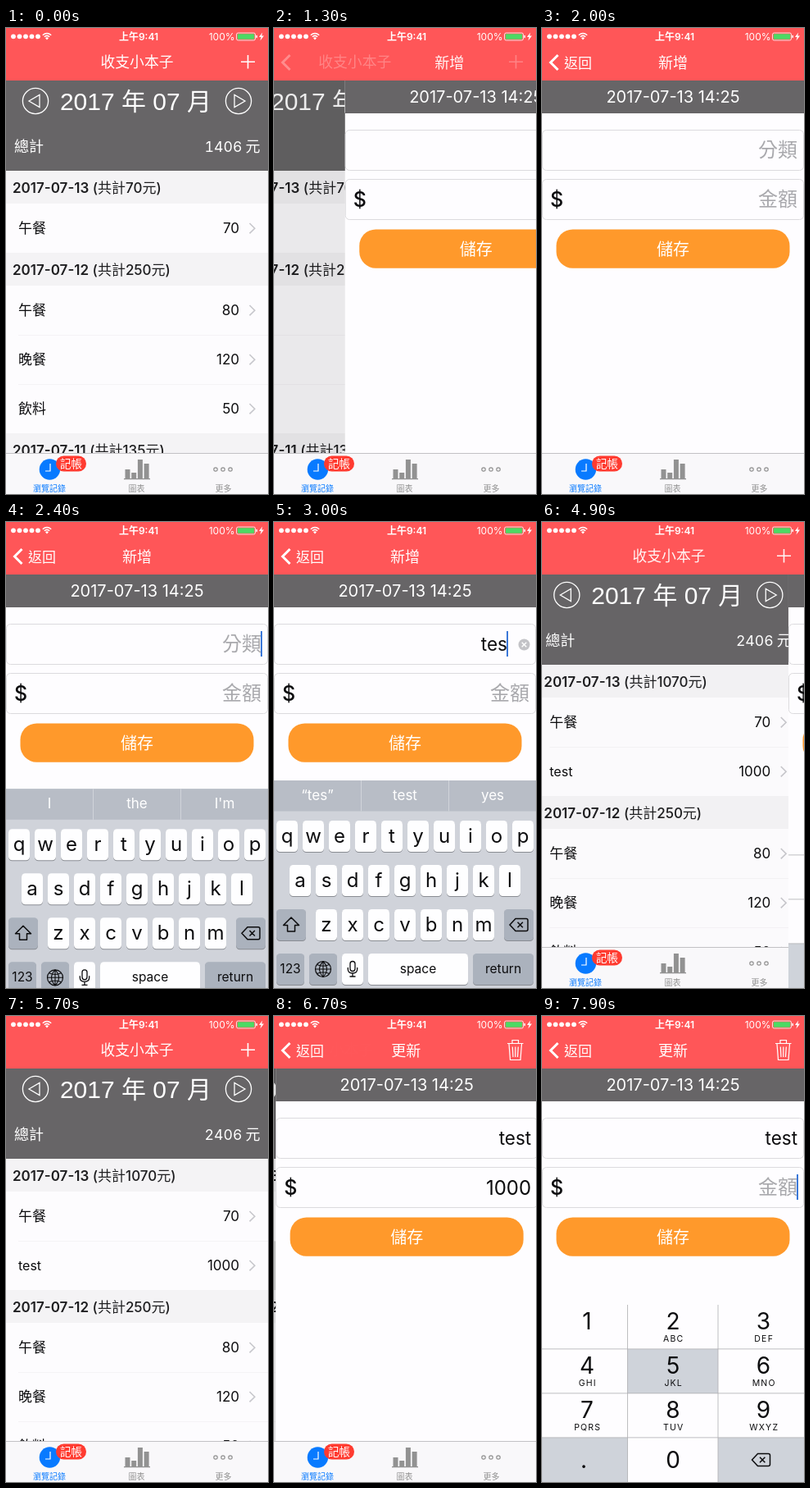
An HTML page that plays this animation: 320x568 px, repeating every 8000 ms.

```html
<!DOCTYPE html>
<html lang="zh-Hant">
<head>
<meta charset="utf-8">
<title>收支小本子</title>
<style>
html, body { margin: 0; width: 100%; height: 100%; overflow: hidden; background: #fff; }
svg { display: block; width: 320px; height: 568px; }
text { font-family: Inter, 'Noto Sans CJK TC', 'Noto Sans CJK', 'Noto Sans CJK JP', sans-serif; white-space: pre; }
.wide { font-family: 'Liberation Sans', 'Noto Sans CJK TC', 'Noto Sans CJK JP', sans-serif; font-weight: 300; }
.total { font-variant-numeric: tabular-nums; }
</style>
</head>
<body>
<svg id="stage" viewBox="0 0 320 568"></svg>
<script>
const stage = document.getElementById('stage');
const RED = '#ff5658', GREY = '#676567', BLUE = '#087aff', INK = '#0c0c0e';
const KEY_DARK = '#abb2bd', KEY_BG = '#d0d3da';

function el(parent, tag, attrs = {}, content) {
  const node = document.createElementNS('http://www.w3.org/2000/svg', tag);
  for (const k in attrs) node.setAttribute(k, attrs[k]);
  if (content !== undefined) node.textContent = content;
  parent.appendChild(node);
  return node;
}
const group = (parent) => el(parent, 'g');
const rect = (p, x, y, width, height, fill, more) => el(p, 'rect', { x, y, width, height, fill, ...more });
const circle = (p, cx, cy, r, more) => el(p, 'circle', { cx, cy, r, ...more });
const line = (p, d, stroke, width = 1, more) =>
  el(p, 'path', { d, stroke, 'stroke-width': width, fill: 'none', ...more });
// cy is the optical centre of the line of text
const text = (p, x, cy, str, size, fill = INK, anchor = 'start', more) =>
  el(p, 'text', { x, y: cy + size * 0.363, 'font-size': size, fill, 'text-anchor': anchor, ...more }, str);
const move = (node, x, y = 0) => node.setAttribute('transform', `translate(${x.toFixed(2)} ${y.toFixed(2)})`);
const show = (node, on) => node.setAttribute('opacity', Math.max(0, Math.min(1, +on)));
const setText = (node, s) => { if (node.textContent !== s) node.textContent = s; };

// ---- list screen
const day12 = ['2017-07-12', 250, [['午餐', 80], ['晚餐', 120], ['飲料', 50]]];
const day11 = ['2017-07-11', 135, []];
const before = [['2017-07-13', 70, [['午餐', 70]]], day12, day11];
const after = [['2017-07-13', 1070, [['午餐', 70], ['test', 1000]]], day12, day11];

function buildList(total, days) {
  const g = group(stage);
  rect(g, 0, 64, 320, 504, '#fdfcfe');
  rect(g, 0, 64, 320, 110, GREY);
  for (const [cx, s] of [[36, -1], [284, 1]]) {
    circle(g, cx, 89, 15.6, { fill: 'none', stroke: '#fff', 'stroke-width': 1.3 });
    line(g, `M${cx + 8 * s} 89L${cx - 5 * s} 81.5V96.5Z`, '#fff', 1.3);
  }
  text(g, 158.5, 89.2, '2017 年 07 月', 30, '#fff', 'middle', { class: 'wide' });
  text(g, 10, 144, '總計', 18, '#fff', 'start', { class: 'wide' });
  text(g, 288.5, 144.5, total, 17.7, '#fff', 'end', { class: 'total' });
  text(g, 310.5, 144, '元', 18, '#fff', 'end', { class: 'wide' });
  let y = 174, picked;
  for (const [date, sum, rows] of days) {
    rect(g, 0, y, 320, 40, '#f4f3f5');
    const head = text(g, 8, y + 21, '', 17, '#1e1e20');
    el(head, 'tspan', { 'font-weight': 600 }, date);
    el(head, 'tspan', { 'font-weight': 500 }, ` (共計${sum}元)`);
    y += 40;
    rows.forEach(([name, cost], i) => {
      const bg = rect(g, 0, y, 320, 60, '#d9d9d9', { opacity: 0 });
      if (name === 'test') picked = bg;
      if (i) rect(g, 15, y, 305, 0.6, '#f0eff2');
      text(g, 15, y + 30, name, name === 'test' ? 16 : 17);
      text(g, 285, y + 30, cost, 17, INK, 'end');
      line(g, `M297.5 ${y + 24}l6.3 6.2l-6.3 6.2`, '#c7c7cc', 1.6);
      y += 60;
    });
  }
  return { g, picked };
}
const lists = [buildList(1406, before), buildList(2406, after)];
const shade = rect(stage, 0, 64, 320, 504, '#000');

// ---- entry form
const page = group(stage);
rect(page, 0, 64, 320, 504, '#fefdff');
rect(page, 0, 64, 320, 40, GREY);
text(page, 160, 84, '2017-07-13 14:25', 20, '#fff', 'middle');
function buildField(y, hint, size) {
  rect(page, 0.5, y + 0.5, 319, 49, '#fefdff', { rx: 5, stroke: '#dcdbde' });
  const clear = group(page);
  circle(clear, 305.5, y + 25.5, 7, { fill: '#c3c3c7' });
  line(clear, `M302.7 ${y + 22.7}l5.6 5.6m0 -5.6l-5.6 5.6`, '#fff', 1.4);
  return {
    clear,
    hint: text(page, 312, y + 24.4, hint, 24, '#a9a9ad', 'end', { 'font-weight': 300 }),
    value: text(page, 312, y + 25, '', size, INK, 'end'),
    caret: rect(page, 0, y + 9, 2, 31, '#3b78d8')
  };
}
const kind = buildField(124, '分類', 22.5), sum = buildField(184, '金額', 24);
text(page, 10, 209, '$', 25, INK, 'start', { 'font-weight': 500 });
rect(page, 17.5, 245.5, 285, 47.2, '#ff992b', { rx: 20 });
const save = text(page, 160, 270, '儲存', 20, '#fff', 'middle');

// ---- tab bar
const tabs = group(stage);
rect(tabs, 0, 518, 320, 50, '#f9f8fa');
rect(tabs, 0, 518, 320, 0.8, '#b4b4b7');
circle(tabs, 53.4, 538, 12.7, { fill: BLUE });
line(tabs, 'M54 531V540H48', '#fff', 1.2);
rect(tabs, 61, 521.5, 37, 19, '#ff3b30', { rx: 9.5 });
text(tabs, 79.5, 531, '記帳', 13.5, '#fff', 'middle');
[12, 8, 24, 19].forEach((h, i) => rect(tabs, 145.5 + i * 7.7, 550 - h, 6, h, '#929292'));
rect(tabs, 144, 549, 32, 1.3, '#929292');
for (const x of [256, 265, 274])
  circle(tabs, x, 538, 2.2, { fill: 'none', stroke: '#929292', 'stroke-width': 1.2 });
[['瀏覽記錄', 53, BLUE], ['圖表', 159.5, '#929292'], ['更多', 265.5, '#929292']]
  .forEach(([s, x, c]) => text(tabs, x, 561, s, 10, c, 'middle'));

// ---- navigation and status bar
rect(stage, 0, 0, 320, 64, RED);
const nav = group(stage);
const home = text(nav, 160, 42, '收支小本子', 17.8, '#fff', 'middle');
const title = text(nav, 160, 42, '', 18, '#fff', 'middle');
const chevron = line(nav, 'M19.5 33L10.5 42L19.5 51', '#fff', 3);
const back = text(nav, 27, 42.4, '返回', 17, '#fff');
const plus = line(nav, 'M287 41.2H304M295.5 33V49.5', '#fff', 1.6);
const trash = line(nav, 'M285 33.5H304.5M291 33V29.5H298.5V33M287 34L288.5 53.5H301L302.5 34M291.3 37.5L292 50M294.8 37.5V50M298.3 37.5L297.5 50', '#fff', 1.2);

for (let i = 0; i < 5; i++) circle(stage, 9 + i * 7.5, 10.3, 2.9, { fill: '#fff' });
line(stage, 'M44.8 8.7Q50 4.3 55.2 8.7M46.8 10.8Q50 8 53.2 10.8', '#fff', 1.5);
el(stage, 'path', { d: 'M48 12.2Q50 10.5 52 12.2L50 14.4Z', fill: '#fff' });
text(stage, 162, 10.5, '上午9:41', 12, '#fff', 'middle', { 'font-weight': 600 });
text(stage, 279.5, 10.5, '100%', 12, '#fff', 'end');
rect(stage, 281.5, 6, 23, 9, 'none', { rx: 2, stroke: '#fff', 'stroke-width': 0.8 });
rect(stage, 282.8, 7.2, 20.4, 6.6, '#4cd964', { rx: 1 });
rect(stage, 305.4, 8.8, 1.5, 3.4, '#fff', { rx: 0.7 });
el(stage, 'path', { d: 'M313.2 5.5L309 11H311.6L310.4 15.5L315 9.6H312.2Z', fill: '#fff' });

// ---- letter keyboard
const letters = group(stage);
rect(letters, 0, 315, 320, 253, KEY_BG);
rect(letters, 0, 315, 320, 37.5, '#b8bdc6');
for (const x of [106, 213]) rect(letters, x, 315, 1, 37.5, '#d0d4da');
const guesses = [53, 160, 267].map(x => text(letters, x, 332.5, '', 17, '#fff', 'middle'));
const keyPos = {};
function key(x, y, w, label = '', size = 24, fill = '#fefeff') {
  rect(letters, x, y + 1, w, 38, '#898c92', { rx: 4.5 });
  rect(letters, x, y, w, 38, fill, { rx: 4.5 });
  text(letters, x + w / 2, y + 18.5, label, size, INK, 'middle');
}
[['qwertyuiop', 3, 364], ['asdfghjkl', 19, 418], ['zxcvbnm', 51, 472]].forEach(([row, x0, y]) =>
  [...row].forEach((c, i) => {
    keyPos[c] = [x0 + i * 32, y];
    key(x0 + i * 32, y, 26, c);
  }));
key(3, 472, 36, '', 16, KEY_DARK);
key(281, 472, 36, '', 16, KEY_DARK);
key(3, 526, 34, '123', 15.5, KEY_DARK);
key(43, 526, 34, '', 16, KEY_DARK);
key(83, 526, 26);
key(115, 526, 122, 'space', 15.5);
key(243, 526, 74, 'return', 15.5, KEY_DARK);
line(letters, 'M21 482L30.5 491.5H25.5V499H16.5V491.5H11.5Z', INK, 1.5, { 'stroke-linejoin': 'round' });
const erase = (p, x, y) => line(p,
  `M${x - 11} ${y}l7 -7.5h13q2 0 2 2v11q0 2 -2 2h-13zM${x - 1.5} ${y - 3.2}l6.4 6.4m0 -6.4l-6.4 6.4`, INK, 1.5);
erase(letters, 299, 491);
circle(letters, 60, 545, 9.5, { fill: 'none', stroke: INK, 'stroke-width': 1.2 });
line(letters, 'M50.5 545H69.5M60 535.5V554.5M52.5 539.5Q60 543 67.5 539.5M52.5 550.5Q60 547 67.5 550.5M60 535.5Q51 545 60 554.5Q69 545 60 535.5', INK, 1.1);
rect(letters, 93, 535.5, 6, 12, 'none', { rx: 3, stroke: INK, 'stroke-width': 1.3 });
line(letters, 'M90.3 543V545Q90.3 550 96 550Q101.7 550 101.7 545V543M96 550V554M92.5 554H99.5', INK, 1.3);
const bubble = group(letters);
el(bubble, 'path', {
  d: 'M-3 -52H29Q36 -52 36 -45V-18Q36 -12 31 -8Q26 -4 26 2V34Q26 38 22 38H4Q0 38 0 34V2Q0 -4 -5 -8Q-10 -12 -10 -18V-45Q-10 -52 -3 -52Z',
  fill: '#fefeff', stroke: '#b6b9bf', 'stroke-width': 0.6
});
const bubbleText = text(bubble, 13, -29, '', 35, INK, 'middle');

// ---- number keyboard
const pad = group(stage);
rect(pad, 0, 352, 320, 216, '#fefdff');
const padKeys = {};
const cols = [[0, 104.5, 55], [104.5, 110.5, 160], [215, 105, 270.5]];
['1', '2ABC', '3DEF', '4GHI', '5JKL', '6MNO', '7PQRS', '8TUV', '9WXYZ', '.', '0', '<'].forEach((s, i) => {
  const [x, w, cx] = cols[i % 3], y = 352 + 54 * Math.floor(i / 3), c = s[0];
  padKeys[c] = rect(pad, x, y, w, 54, '#cfd3da');
  if (c === '<') erase(pad, 267.5, y + 27);
  else text(pad, c === '.' ? 51 : cx, y + (i < 9 ? 20 : 27), c, 28, INK, 'middle');
  if (s.length > 1)
    text(pad, cx + 0.7, y + 41, s.slice(1), 10.5, INK, 'middle', { 'letter-spacing': 1.2 });
});
for (const y of [406, 460, 514]) rect(pad, 0, y - 0.5, 320, 0.8, '#aeaeb2');
for (const x of [104.5, 215]) rect(pad, x - 0.4, 352, 0.8, 216, '#aeaeb2');

// ---- timeline: [start in ms, value]
const LOOP = 8000;
const POP = 4650, REOPEN = 6305;
const steps = {
  plus: [[0, 1], [200, 0.3], [700, 0.65], [800, 1]],
  focus: [[0, ''], [2100, 'kind'], [3500, 'sum'], [5200, ''], [7400, 'sum']],
  kind: [[0, ''], [2700, 't'], [2900, 'te'], [3000, 'tes'], [3200, 'test']],
  sum: [[0, ''], [3700, '1'], [3900, '10'], [4000, '100'], [4200, '1000'], [7400, '']],
  letter: [[0, ''], [2600, 't'], [2700, ''], [2800, 'e'], [2900, 's'], [3000, ''], [3100, 't'], [3200, '']],
  digit: [[0, ''], [3600, '1'], [3700, ''], [3800, '0'], [3900, ''], [4000, '0'], [4200, ''], [7900, '5']],
  save: [[0, 1], [4500, 0.3], [4700, 1]],
  row: [[0, 0], [6000, 1]]
};
const hints = {
  '': ['I', 'the', "I'm"], t: ['“t”', 'to', 'the'], te: ['“te”', 'tell', 'text'],
  tes: ['“tes”', 'test', 'yes'], test: ['“test”', 'tests', 'testing']
};
const at = (name, t) => steps[name].filter(s => s[0] <= t).pop()[1];

// cubic-bezier(.36, .66, .04, 1)
function ease(x) {
  if (x <= 0) return 0;
  if (x >= 1) return 1;
  const bez = (s, a, b) => 3 * (1 - s) ** 2 * s * a + 3 * (1 - s) * s * s * b + s ** 3;
  let lo = 0, hi = 1;
  for (let i = 0; i < 24; i++) {
    const m = (lo + hi) / 2;
    if (bez(m, 0.36, 0.04) < x) lo = m; else hi = m;
  }
  return bez(lo, 0.66, 1);
}

function drawField(f, value, active) {
  const end = active && value ? 285 : 312;
  setText(f.value, value);
  f.value.setAttribute('x', end);
  f.caret.setAttribute('x', end - 1);
  show(f.hint, !value);
  show(f.caret, active);
  show(f.clear, active && value);
}

function draw(t) {
  const second = t >= POP, editing = t >= REOPEN;
  const open = !second ? ease((t - 1167) / 500)
    : editing ? ease((t - REOPEN) / 500) : 1 - ease((t - POP) / 500);
  const x = 320 * (1 - open);

  lists.forEach((l, i) => {
    show(l.g, i === +second);
    move(l.g, -96 * open);
  });
  show(lists[1].picked, at('row', t));
  show(shade, open * 0.1);
  move(page, x);

  move(home, -84 * open);
  show(home, 1 - open);
  setText(title, editing ? '更新' : '新增');
  move(title, 200 * (1 - open));
  show(title, open * 1.3);
  show(chevron, (open - 0.6) / 0.4);
  show(back, (open - 0.75) / 0.25);
  show(plus, (1 - open) * at('plus', t));
  show(trash, editing ? open : 0);

  const focus = at('focus', t), word = at('kind', t);
  drawField(kind, word, focus === 'kind');
  drawField(sum, at('sum', t), focus === 'sum');
  show(save, at('save', t));

  show(letters, focus === 'kind');
  move(letters, 0, 254 * (1 - ease((t - 2175) / 400)));
  hints[word].forEach((s, i) => setText(guesses[i], s));
  const pressed = at('letter', t);
  show(bubble, !!pressed);
  if (pressed) {
    move(bubble, ...keyPos[pressed]);
    setText(bubbleText, pressed);
  }

  show(pad, focus === 'sum');
  move(pad, x, editing ? 216 * (1 - ease((t - 7370) / 400)) : 0);
  const digit = at('digit', t);
  for (const c in padKeys) show(padKeys[c], c === digit || c === '.' || c === '<');
}

const start = performance.now();
function tick() {
  const t = (performance.now() - start) % LOOP;
  draw(Math.floor(t / 100) * 100);
  requestAnimationFrame(tick);
}
tick();
</script>
</body>
</html>
```
